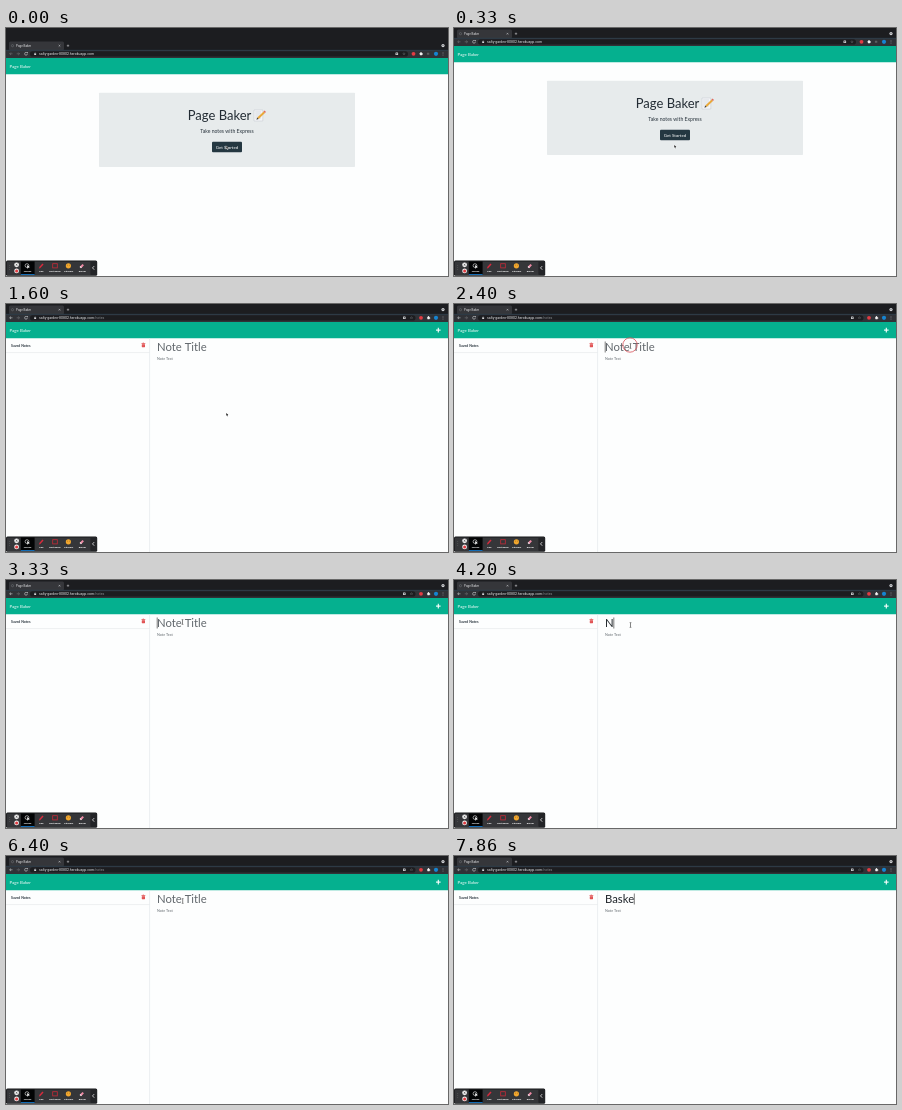
Animation of 442x248 px, one loop 8 s. Source, as an HTML page with a canvas:

```html
<!DOCTYPE html>
<html lang="en">
<head>
<meta charset="utf-8">
<title>Page Baker</title>
<style>
html, body { margin: 0; width: 100%; height: 100%; overflow: hidden; background: #fff; }
canvas { display: block; width: 100vw; height: 100vh; }
</style>
</head>
<body>
<canvas></canvas>
<script>
const W = 442, H = 248, LOOP = 8000;
const APP = 'Page Baker';
const LATO = 'Lato, sans-serif', UI = 'Roboto, sans-serif';
const canvas = document.querySelector('canvas');
const c = canvas.getContext('2d');

const T = { press: 930, loading: 1100, notes: 1530, click: 2260, clickEnd: 2600 };

// [start, text, caret visible]
const typing = [
  [0, '', false], [2260, '', true], [2860, '', false], [3330, '', true],
  [3600, 'N', true], [4660, 'N', false], [4930, '', true], [5330, '', false],
  [5860, '', true], [6400, '', false], [6860, '', true], [6930, 'B', true],
  [7130, 'Ba', true], [7400, 'Bas', true], [7660, 'Bask', true], [7860, 'Baske', true]
];

// [time, x, y]
const pointerPath = [
  [0, 220.3, 118], [400, 220.3, 117], [860, 220.3, 109], [1600, 220.3, 109],
  [2200, 176.5, 42], [3600, 176.5, 42], [3860, 176.5, 45], [LOOP, 176.8, 45]
];

const clamp = v => Math.max(0, Math.min(1, v));
const ease = v => v * v * (3 - 2 * v);

function rect(x, y, w, h, color, r = 0) {
  c.fillStyle = color;
  c.beginPath();
  c.roundRect(x, y, w, h, r);
  c.fill();
}

function dot(x, y, r, color) {
  c.fillStyle = color;
  c.beginPath();
  c.arc(x, y, r, 0, 7);
  c.fill();
}

function ring(x, y, r, color, width = 0.6, end = Math.PI * 2) {
  c.strokeStyle = color;
  c.lineWidth = width;
  c.beginPath();
  c.arc(x, y, r, 0, end);
  c.stroke();
}

function line(color, width, ...points) {
  c.strokeStyle = color;
  c.lineWidth = width;
  c.beginPath();
  for (let i = 0; i < points.length; i += 2) c.lineTo(points[i], points[i + 1]);
  c.stroke();
}

function shape(color, ...points) {
  c.fillStyle = color;
  c.beginPath();
  for (let i = 0; i < points.length; i += 2) c.lineTo(points[i], points[i + 1]);
  c.closePath();
  c.fill();
}

function text(str, x, y, size, color, { align = 'left', weight = 400, font = LATO } = {}) {
  c.font = `${weight} ${size}px ${font}`;
  c.textAlign = align;
  c.fillStyle = color;
  c.fillText(str, x, y);
  return c.measureText(str).width;
}

function pointerAt(t) {
  const i = pointerPath.findIndex(p => p[0] > t);
  const [t0, x0, y0] = pointerPath[i - 1], [t1, x1, y1] = pointerPath[i];
  const k = ease((t - t0) / (t1 - t0));
  return [x0 + (x1 - x0) * k, y0 + (y1 - y0) * k];
}

function drawBrowser(t) {
  const onNotes = t >= T.notes, loading = t >= T.loading && !onNotes;
  const light = '#d4d6d9', dim = '#777a7e';
  rect(0, -14, W, 24.5, '#1c1d20');
  rect(3, 1.5, 55, 9, '#35363a', 1.5);
  rect(0, 10, W, 8, '#303237');
  line('#29475a', 0.5, 0, 10.3, W, 10.3);
  ring(6.5, 5.7, 1.1, dim, 0.5);
  text(APP, 10, 6.7, 3, '#e4e5e7', { font: UI });
  line(light, 0.5, 52.7, 4.9, 54.3, 6.5);
  line(light, 0.5, 52.7, 6.5, 54.3, 4.9);
  line(light, 0.5, 60.8, 5.7, 63.2, 5.7);
  line(light, 0.5, 62, 4.5, 62, 6.9);
  dot(437, 5.6, 1.6, light);
  shape('#222', 436.3, 5.2, 437.7, 5.2, 437, 6.2);

  const back = t >= T.loading ? light : dim;
  line(back, 0.55, 6.5, 13.8, 3.7, 13.8);
  line(back, 0.55, 5, 12.5, 3.7, 13.8, 5, 15.1);
  line(dim, 0.55, 10.7, 13.8, 13.5, 13.8);
  line(dim, 0.55, 12.2, 12.5, 13.5, 13.8, 12.2, 15.1);
  if (loading) {
    line(light, 0.55, 18.8, 12.6, 21.2, 15);
    line(light, 0.55, 18.8, 15, 21.2, 12.6);
  } else {
    ring(20, 13.8, 1.4, light, 0.55, 5.3);
    shape(light, 20.3, 12.3, 21.7, 12, 21.7, 13.5);
  }

  const shift = onNotes ? 7.5 : 0;
  rect(24, 11.2, 378 + shift, 5.4, '#1c1d20', 2.7);
  rect(28.2, 13.5, 1.9, 1.6, light, 0.2);
  ring(29.15, 13.3, 0.6, light, 0.3);
  const w = text('salty-garden-80802.herokuapp.com', 33, 15.1, 3.5, '#e6e7e9', { font: UI });
  if (t >= T.loading) text('/notes', 33 + w, 15.1, 3.5, '#8d9094', { font: UI });

  rect(389.5 + shift, 12.5, 2.6, 2.6, light, 0.4);
  rect(390.3 + shift, 13.3, 1, 1, '#222');
  text('☆', 398 + shift, 15.2, 3.8, light, { align: 'center', font: 'DejaVu Sans, sans-serif' });
  dot(407.5 + shift, 13.8, 1.9, '#e23c43');
  rect(413.8 + shift, 12.8, 2.4, 2.4, '#f1f1f1', 0.4);
  dot(415 + shift, 12.7, 0.6, '#f1f1f1');
  dot(416.3 + shift, 14, 0.6, '#f1f1f1');
  if (!onNotes) rect(420.9, 12.7, 2.4, 2.1, '#5c5f63', 0.3);
  dot(430, 13.8, 2.1, '#1685d1');
  for (const y of [12.5, 13.8, 15.1]) dot(437, y, 0.35, light);

  rect(0, 18, W, 16.2, '#05b08f');
  text(APP, 3.5, 27.7, 4.4, '#fff');
}

function drawMemoIcon(x, y) {
  shape('#f4f5f7', x, y, x + 8.8, y, x + 8.8, y + 11, x, y + 11);
  line('#b9bec4', 0.4, x, y, x + 8.8, y, x + 8.8, y + 11, x, y + 11, x, y);
  for (let i = 1; i < 5; i++) line('#aeb7c2', 0.4, x + 1.2, y + 2 * i, x + 7, y + 2 * i);
  line('#e9a93a', 2, x + 4, y + 8.2, x + 10.3, y + 2.2);
  line('#e06a60', 2, x + 10.2, y + 2.3, x + 11.3, y + 1.2);
  shape('#3b3a38', x + 3.3, y + 7.6, x + 4.6, y + 9, x + 2.4, y + 9.8);
}

function drawHome(t) {
  rect(93, 52.7, 256, 74.3, '#e7ebec', 0.8);
  const center = { align: 'center' };
  text(APP, 213.5, 79.8, 13, '#222b33', center);
  drawMemoIcon(248, 70);
  text('Take notes with Express', 221, 93.2, 5.1, '#27323b', center);
  const pressed = t >= T.press;
  if (pressed) rect(205, 100.8, 32, 12.4, '#a4afb7', 1.6);
  rect(206, 101.8, 30, 10.4, pressed ? '#17242c' : '#243741', 1);
  text('Get Started', 221, 108.7, 4.5, '#fff', center);
}

function drawNotes(t) {
  line('#fff', 1.1, 430, 26.1, 434.6, 26.1);
  line('#fff', 1.1, 432.3, 23.8, 432.3, 28.4);
  line('#dfe3e6', 0.6, 143.6, 34.2, 143.6, H);
  line('#e3e6e8', 0.6, 0, 48.6, 143.6, 48.6);
  text('Saved Notes', 5, 42.8, 3.5, '#27323b', { weight: 700 });
  rect(135.5, 39.2, 3.8, 0.7, '#df4748');
  rect(136.7, 38.7, 1.4, 0.6, '#df4748');
  rect(135.8, 40.2, 3.2, 3, '#df4748', 0.4);
  line('#f6b7b7', 0.25, 136.8, 40.7, 136.8, 42.7);
  line('#f6b7b7', 0.25, 138, 40.7, 138, 42.7);

  const [, value, caret] = typing.findLast(s => s[0] <= t);
  const size = 11.3;
  text(value || 'Note Title', 151, 47.1, size, value ? '#20262b' : '#61676c');
  if (caret) {
    const x = 151.2 + (value ? c.measureText(value).width : 0);
    line('#222', 0.6, x, 37.5, x, 48.5);
  }
  text('Note Text', 151, 56.2, 3.7, '#666d72');
}

function drawToolbar() {
  rect(0, 232.6, 91.2, 15.1, '#17181a', 1.5);
  rect(0.7, 233.4, 89.8, 13.6, '#353639', 1);
  for (const y of [237.5, 239.5, 241.5]) dot(3.8, y, 0.35, '#999');
  dot(10.6, 236.8, 2.4, '#f0f0f0');
  line('#333', 0.6, 9.7, 235.9, 11.5, 237.7);
  line('#333', 0.6, 9.7, 237.7, 11.5, 235.9);
  dot(10.6, 242.9, 2.4, '#f0f0f0');
  dot(10.6, 242.9, 1.5, '#df3b40');
  rect(14.8, 233.4, 13.8, 13.6, '#030405');
  rect(14.8, 246.1, 13.8, 0.9, '#1678c8');

  ring(21, 237.6, 1.9, '#eee', 0.6);
  shape('#fff', 21, 237, 24, 239.3, 22.4, 239.6, 21.6, 241);
  line('#d72b3d', 1.5, 33.8, 239.5, 37, 236);
  shape('#d72b3d', 33.1, 238.9, 34.5, 240.1, 32.9, 240.5);
  c.strokeStyle = '#c72a38';
  c.lineWidth = 0.8;
  c.strokeRect(46.7, 235.7, 4.6, 4.2);
  dot(62.4, 237.8, 2.6, '#f2a72e');
  dot(61.5, 237.1, 0.35, '#563b12');
  dot(63.3, 237.1, 0.35, '#563b12');
  line('#f08aa6', 2, 74.7, 239.2, 77.2, 236.6);
  line('#f6e3e8', 2, 74.3, 239.6, 75.1, 238.8);
  ['Mouse', 'Pen', 'Rectangle', 'Stickers', 'Eraser'].forEach((label, i) =>
    text(label, 21.6 + 13.7 * i, 243.9, 2.5, '#fff', { align: 'center', weight: 700, font: UI }));
  rect(84.4, 233.4, 6.1, 13.6, '#232427', 1);
  line('#eee', 0.8, 88.2, 238.1, 86.5, 239.9, 88.2, 241.7);
}

function drawPointer(t) {
  const [x, y] = pointerAt(t);
  const hidden = t >= 3600 && t < 3730 || t >= 6930;
  if (t >= T.click && t < T.clickEnd) ring(176, 41, 7.2, '#d9525a', 0.8);
  if (hidden) return;
  if (t > 2050) {
    line('#333', 0.6, x, y - 2.2, x, y + 2.2);
    line('#333', 0.5, x - 0.9, y - 2.4, x + 0.9, y - 2.4);
    line('#333', 0.5, x - 0.9, y + 2.4, x + 0.9, y + 2.4);
  } else if (t > 700 && t < T.notes) {
    rect(x - 0.5, y, 1.1, 3.5, '#fff', 0.5);
    rect(x - 1.1, y + 1.6, 2.8, 2.4, '#fff', 0.7);
    line('#222', 0.25, x + 0.6, y + 1.8, x + 0.6, y + 3);
  } else {
    shape('#fff', x - 0.5, y - 0.6, x - 0.5, y + 3.4, x + 0.6, y + 2.8, x + 1.2, y + 3.9, x + 2, y + 3.4, x + 1.5, y + 2.2, x + 2.6, y + 2.1);
    shape('#111', x, y, x, y + 2.7, x + 0.7, y + 2.2, x + 1.2, y + 3.4, x + 1.6, y + 3.1, x + 1.1, y + 2, x + 2, y + 1.9);
  }
}

function draw(t) {
  const dpr = devicePixelRatio || 1;
  const w = Math.round(innerWidth * dpr), h = Math.round(innerHeight * dpr);
  if (canvas.width !== w || canvas.height !== h) {
    canvas.width = w;
    canvas.height = h;
  }
  c.setTransform(w / W, 0, 0, h / H, 0, 0);
  rect(0, 0, W, H, '#fdfefe');

  // The window slides up as it enters full screen.
  c.save();
  c.translate(0, 12 * (1 - ease(clamp(t / 270))));
  drawBrowser(t);
  if (t < T.notes) drawHome(t); else drawNotes(t);
  c.restore();

  drawToolbar();
  if (t >= 860 && t < T.notes) {
    rect(0, 243.7, 68, 4.3, '#36383b', 0.6);
    text('https://salty-garden-80802.herokuapp.com/notes', 1, 246.9, 3, '#cfd1d3', { font: UI });
  }
  drawPointer(t);
}

function tick() {
  draw(performance.now() % LOOP);
  requestAnimationFrame(tick);
}
tick();
</script>
</body>
</html>
```
